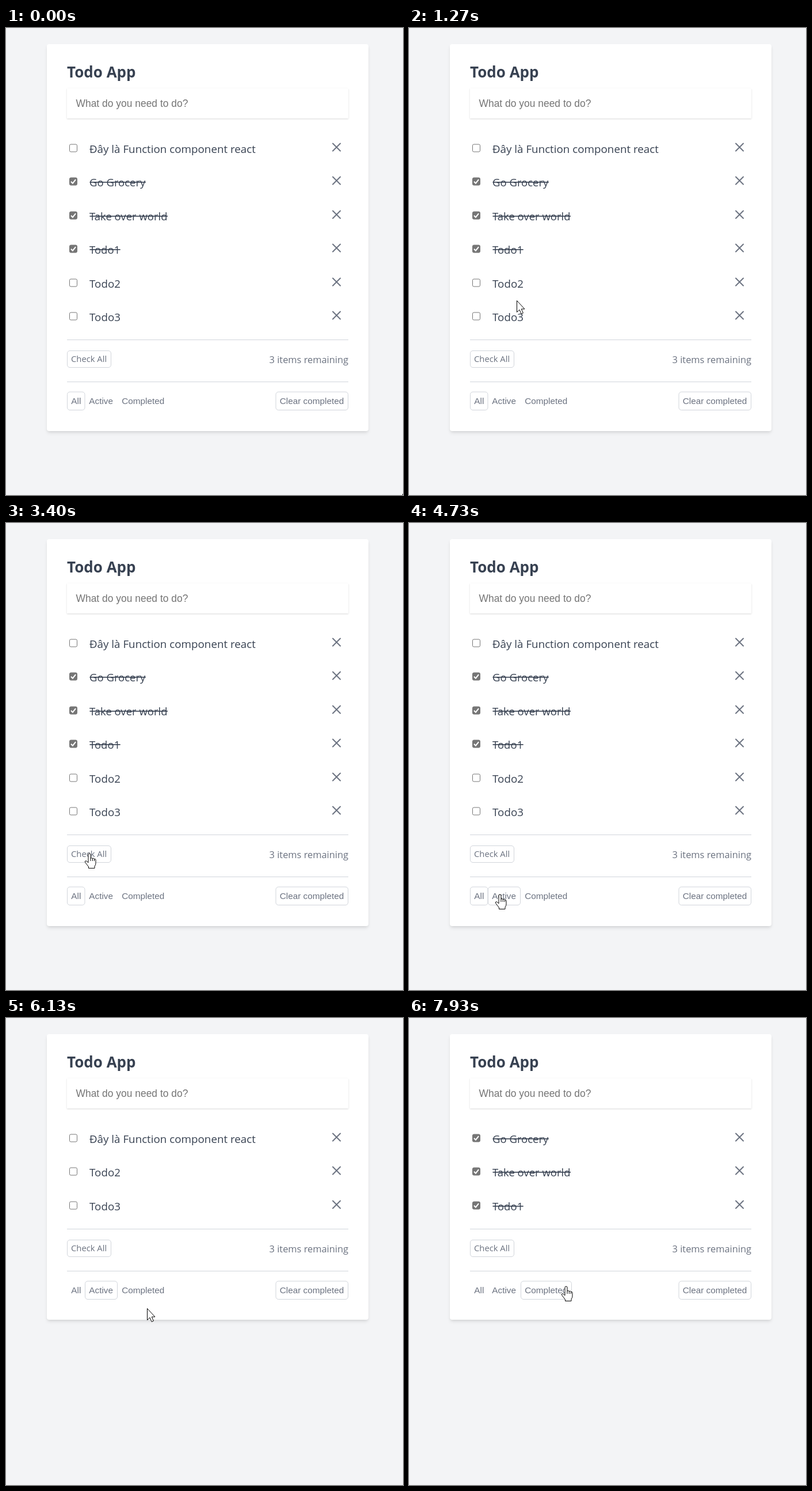
These frames come from a looping animation (690 px wide and 811 px high, 8000 ms). An HTML page:

```html
<!DOCTYPE html>
<html lang="en">
<head>
<meta charset="utf-8">
<title>Todo App</title>
<style>
  html, body { margin: 0; width: 100%; height: 100%; overflow: hidden; background: #f3f4f6; }
  #stage { position: absolute; left: 0; top: 0; width: 690px; height: 811px; overflow: hidden; }
  #card {
    position: absolute; left: 71px; top: 27.5px; width: 558.5px; border-radius: 4px; background: #fff;
    box-shadow: 0 4px 6px -1px rgba(0,0,0,.1), 0 2px 4px -1px rgba(0,0,0,.06);
  }
  #field {
    position: absolute; left: 106px; top: 105px; width: 489px; height: 52px; background: #fff;
    box-shadow: 0 1px 3px rgba(0,0,0,.1), 0 1px 2px rgba(0,0,0,.06);
  }
  svg { position: absolute; left: 0; top: 0; }
  text { font-family: "Open Sans", "Noto Sans", sans-serif; fill: #6b7280; }
  .title { font-size: 26px; font-weight: 700; fill: #374151; }
  .item { font-size: 18.8px; fill: #374151; }
  .arial { font-family: "Liberation Sans", Arial, sans-serif; font-size: 15.3px; }
  .frame { fill: none; stroke: #d1d5db; }
  .cross { fill: none; stroke: #6b7280; stroke-width: 2; stroke-linecap: round; }
  .cursor { fill: #fff; stroke: #000; stroke-linejoin: round; }
</style>
</head>
<body>
<div id="stage">
  <div id="card"></div>
  <div id="field"></div>
  <svg width="690" height="811" viewBox="0 0 690 811">
    <text class="title" x="106" y="86">Todo App</text>
    <text class="arial" x="121.5" y="137" style="font-size:17.45px;fill:#757575">What do you need to do?</text>
    <g id="rows"></g>
    <g id="footer">
      <path class="frame" d="M106 541.5H595M106 614.5H595"/>
      <text x="113" y="580" font-size="14.8">Check All</text>
      <text x="595" y="581.5" font-size="16.4" text-anchor="end">3 items remaining</text>
    </g>
    <path id="arrow" class="cursor" d="M.5 .5V20.5L5 16.3 8.2 23.5 11.4 22 8.3 15H14Z"/>
    <path id="hand" class="cursor" d="M-2 2a2 2 0 0 1 4 0V8q2.200-1.300 3.400.6 2.100-1.200 3.100.8 2.200-.5 2.500 1.600V17q0 3-2 5V25.500H-1.500V23L-7 15.800q-1.500-2 0-2.900 1.600-.6 3 1L-2 15.800ZM2 8v5M5.400 8.600v4.400M8.500 9.400v3.600"/>
  </svg>
</div>
<script>
const $ = id => document.getElementById(id);
const STEP = 1000 / 15, STEPS = 120, PITCH = 58.4;

function add(parent, tag, attrs, text) {
  const el = document.createElementNS("http://www.w3.org/2000/svg", tag);
  for (const name in attrs) el.setAttribute(name, attrs[name]);
  if (text) el.textContent = text;
  parent.appendChild(el);
  return el;
}
const show = (el, on) => { el.style.display = on ? "" : "none"; };
const move = (el, x, y) => el.setAttribute("transform", `translate(${x} ${y})`);

// Todo rows, drawn at the first row's place
const items = [
  ["Đây là Function component react", false], ["Go Grocery", true], ["Take over world", true],
  ["Todo1", true], ["Todo2", false], ["Todo3", false]
].map(([label, done]) => {
  const row = add($("rows"), "g", {});
  add(row, "rect", { x: 110.5, y: 202, width: 13, height: 13, rx: 2.2,
    fill: done ? "#767676" : "#fff", stroke: "#767676" });
  if (done) add(row, "path", { d: "M113 208.8l2.900 2.900 5.200-6.600", fill: "none", stroke: "#fff", "stroke-width": 2 });
  const text = add(row, "text", { class: "item", x: 145, y: 217 }, label);
  if (done) {
    text.style.fontSize = "18.5px";
    add(row, "rect", { x: 145.5, y: 209, width: text.getComputedTextLength(), height: 1.6, fill: "#374151" });
  }
  add(row, "path", { class: "cross", d: "M568 200.500l13 13M581 200.500l-13 13" });
  return { row, done };
});

// Footer buttons; those with a view name are framed only when chosen or hovered
const buttons = [
  { x: 106.5, y: 560.5, w: 76, h: 29 },
  { x: 106.5, y: 632, w: 30.5, h: 31.5, label: "All", view: "all" },
  { x: 137.5, y: 632, w: 56, h: 31.5, label: "Active", view: "active" },
  { x: 194.5, y: 632, w: 88, h: 31.5, label: "Completed", view: "completed" },
  { x: 469, y: 632, w: 125.5, h: 31.5, label: "Clear completed" }
];
for (const b of buttons) {
  b.frame = add($("footer"), "rect", { class: "frame", x: b.x, y: b.y, width: b.w, height: b.h, rx: 4.5 });
  if (b.label) add($("footer"), "text", { class: "arial", x: b.x + 6.8, y: 653 }, b.label);
}

// Pointer path: step, x, y
const path = [
  [3, 689, 809], [4, 645, 765], [8, 400, 525], [12, 185, 318], [14, 140, 306], [16, 206, 349],
  [19, 187, 473], [22, 125, 514], [25, 35, 485], [34, 35, 485], [35, 75, 465], [37, 108, 455],
  [41, 142, 500], [47, 142, 582], [48, 142, 582], [51, 145, 574], [63, 145, 574],
  [71, 158, 645], [87, 158, 645], [92, 245, 504], [95, 254, 380], [98, 190, 198],
  [99, 145, 222], [100, 189, 246], [104, 252, 400], [107, 273, 466], [120, 273, 466]
];

function slope(i, axis) {
  if (!path[i - 1] || !path[i + 1]) return 0;
  const rate = j => (path[j + 1][axis] - path[j][axis]) / (path[j + 1][0] - path[j][0]);
  const a = rate(i - 1), b = rate(i);
  return a * b > 0 ? 2 * a * b / (a + b) : 0;
}

// Monotone cubic through the path points
function pointer(step, axis) {
  if (step <= path[0][0]) return path[0][axis];
  const i = path.findIndex(p => p[0] >= step) - 1;
  const p = path[i], q = path[i + 1], span = q[0] - p[0];
  const u = (step - p[0]) / span, v = 1 - u;
  return Math.round(v * v * (1 + 2 * u) * p[axis] + u * u * (1 + 2 * v) * q[axis] +
    u * v * span * (v * slope(i, axis) - u * slope(i + 1, axis)));
}

function render(time) {
  const step = Math.floor((time + 4) / STEP) % STEPS;
  const view = step < 78 ? "all" : step < 119 ? "active" : "completed";
  const shift = view === "all" ? 0 : -175;
  const x = pointer(step, 1), y = pointer(step, 2);

  let place = 0;
  for (const { row, done } of items) {
    const on = view === "all" || done === (view === "completed");
    show(row, on);
    if (on) move(row, 0, Math.round(PITCH * place++));
  }
  move($("footer"), 0, shift);
  $("card").style.height = (shift ? 496 : 672) + "px";

  let over = false;
  for (const b of buttons) {
    const top = b.y + shift;
    const hit = x >= b.x && x <= b.x + b.w && y >= top && y <= top + b.h;
    over = over || hit;
    show(b.frame, !b.view || hit || b.view === view);
  }
  show($("hand"), over);
  show($("arrow"), !over);
  move($(over ? "hand" : "arrow"), x, y);
}

const start = performance.now();
function tick() {
  render((performance.now() - start) % (STEP * STEPS));
  requestAnimationFrame(tick);
}
render(0);
requestAnimationFrame(tick);
</script>
</body>
</html>
```
